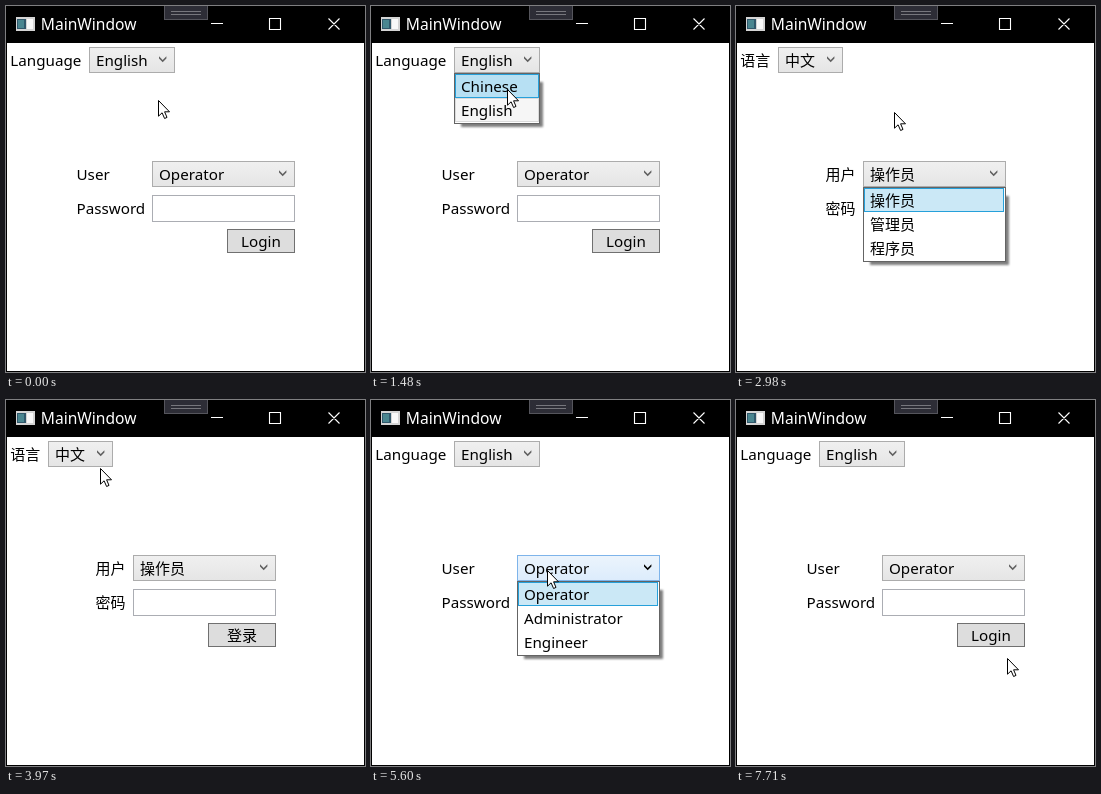
Animation of 359 by 366 pixels, one loop 7960 ms. Source, as an HTML page:

```html
<!DOCTYPE html>
<html lang="en">
<head>
<meta charset="utf-8">
<title>Login window</title>
<style>
html, body { margin: 0; width: 100%; height: 100%; overflow: hidden; background: #fff; }
svg { display: block; }
text { font: 15.2px "Noto Sans", "Noto Sans CJK SC", "Noto Sans CJK", sans-serif; white-space: pre; }
.title { font-size: 15.6px; }
.zh text { font: 15px "Noto Sans CJK SC", "Noto Sans CJK", sans-serif; }
.shadow { filter: blur(1px); opacity: .5; }
</style>
</head>
<body>
<svg width="359" height="366" viewBox="0 0 359 366">
  <defs>
    <linearGradient id="idle" x2="0" y2="1"><stop stop-color="#f0f0f0"/><stop offset="1" stop-color="#e5e5e5"/></linearGradient>
    <linearGradient id="hover" x2="0" y2="1"><stop stop-color="#ecf4fc"/><stop offset="1" stop-color="#dcecfc"/></linearGradient>
  </defs>
  <rect x=".5" y=".5" width="358" height="365" fill="#fff" stroke="#000"/>
  <rect width="359" height="37"/>
  <!-- window icon -->
  <rect x="10" y="11" width="19" height="14" fill="#d4d4d4"/>
  <rect x="11" y="13" width="9" height="10" fill="#31586b"/>
  <rect x="12" y="14" width="6" height="8" fill="#4a8690"/>
  <rect x="21" y="13" width="6" height="10" fill="#f8f8f8"/>
  <text class="title" x="34.8" y="24" fill="#fff">MainWindow</text>
  <!-- collapsed toolbar -->
  <rect x="158.5" y="-.5" width="43" height="14" fill="#2d2d36" stroke="#55555c"/>
  <path d="M165 5.5h30M165 8.5h30" stroke="#77777d"/>
  <path d="M205 17.5h12M263.5 12.5h11v11h-11zM322.5 12.5l11 11M333.5 12.5l-11 11" fill="none" stroke="#fff" stroke-width="1.1"/>
  <g id="form"></g>
  <path id="cursor" d="M.5 .5V16.2L4.1 12.8L6.6 18.5L9 17.4L6.6 11.8H11.5Z" fill="#fff" stroke="#000"/>
</svg>
<script>
const LOOP = 7960, TICK = LOOP / 64, LEAD = 19;   // the screen refreshes once per tick
const LANG = 1, USER = 2;
const PAD = 7, ROW = 24, BOX_W = 143;

const words = {
  en: { lang: 'Language', langs: ['Chinese', 'English'], user: 'User', pass: 'Password', login: 'Login',
        users: ['Operator', 'Administrator', 'Engineer'], boxX: 146, pickX: 83, pickW: 86, chosen: 1 },
  zh: { lang: '语言', langs: ['中文', '英文'], user: '用户', pass: '密码', login: '登录',
        users: ['操作员', '管理员', '程序员'], boxX: 127, pickX: 42, pickW: 65, chosen: 0 }
};

// Each click: tick, language, open list
const clicks = [
  [0, 'en', 0], [7, 'en', LANG], [13, 'zh', 0], [21, 'zh', USER], [26, 'zh', 0],
  [35, 'zh', LANG], [40, 'en', 0], [45, 'en', USER], [53, 'en', 0]
];

// Mouse key points: tick, x, y
const path = [
  [1, 152, 94], [2, 150, 91], [4, 156, 48], [7, 161, 60], [9, 146, 95], [12, 136, 83], [13, 136, 83],
  [20, 190, 164], [23, 190, 164], [24, 158, 106], [26, 125, 37], [30, 96, 75], [32, 94, 68],
  [35, 92, 58], [39, 92, 102], [40, 103, 115], [44, 176, 168], [45, 176, 170], [50, 179, 249],
  [53, 97, 111], [57, 288, 318], [59, 271, 270], [60, 271, 270], [62, 271, 258]
];

function mouse(tick) {
  const i = path.findIndex(p => p[0] > tick);
  const [t1, x1, y1] = path.at(i < 0 ? -1 : i), [t0, x0, y0] = path[Math.max(i - 1, 0)];
  const f = i < 0 ? 1 : Math.max(0, (tick - t0) / (t1 - t0 || 1));
  if (i === 0) return { x: x1, y: y1 };
  return { x: Math.round(x0 + (x1 - x0) * f), y: Math.round(y0 + (y1 - y0) * f) };
}

const rect = (x, y, w, h, fill, stroke) =>
  `<rect x="${x + .5}" y="${y + .5}" width="${w - 1}" height="${h - 1}" fill="${fill}" stroke="${stroke}"/>`;
const text = (x, y, s, anchor = 'start') => `<text x="${x}" y="${y}" text-anchor="${anchor}">${s}</text>`;
const inside = (p, x, y, w, h) => p.x >= x && p.x < x + w && p.y >= y && p.y < y + h;

function combo(p, x, y, w, label) {
  const hot = inside(p, x, y, w, 26);
  return rect(x, y, w, 26, hot ? 'url(#hover)' : 'url(#idle)', hot ? '#7eb4ea' : '#acacac') +
    text(x + PAD, y + 19, label) +
    `<path d="M${x + w - 16} ${y + 9.3}l3.7 3.7l3.7-3.7v2.3l-3.7 3.7l-3.7-3.7z" fill="${hot ? '#000' : '#606060'}"/>`;
}

function list(p, x, y, w, items, chosen) {
  const h = items.length * ROW + 3, rowW = w - 2 - w % 2;
  const top = i => y + 1 + i * ROW;
  const over = items.findIndex((_, i) => inside(p, x + 1, top(i), rowW, ROW));
  const rows = items.map((s, i) => {
    const look = i === over ? ['#b7e0f3', '#26a0da']
      : i !== chosen ? ['none', 'none']
      : over < 0 ? ['#cbe8f6', '#26a0da'] : ['#f6f6f6', '#dadada'];
    return rect(x + 1, top(i), rowW, ROW, ...look) + text(x + PAD, top(i) + 18, s);
  });
  return `<rect class="shadow" x="${x + 7}" y="${y + 9}" width="${w - 4}" height="${h - 6}"/>` +
    rect(x, y, w, h, '#fff', '#646464') + rows.join('');
}

function form(p, lang, open) {
  const k = words[lang], x = k.boxX, labelX = 216.5 - x;
  const hot = inside(p, x + 75, 223, 68, 24);
  return text(4.3, 60, k.lang) +
    combo(p, k.pickX, 41, k.pickW, k.langs[k.chosen]) +
    text(labelX, 174, k.user) +
    combo(p, x, 155, BOX_W, k.users[0]) +
    text(labelX, 208, k.pass) +
    rect(x, 189, BOX_W, 27, '#fff', '#abadb3') +
    rect(x + 75, 223, 68, 24, hot ? '#bee6fd' : '#ddd', hot ? '#3c7fb1' : '#707070') +
    text(x + 109, 241, k.login, 'middle') +
    (open === LANG ? list(p, k.pickX, 67, k.pickW, k.langs, k.chosen) : '') +
    (open === USER ? list(p, x, 181, BOX_W, k.users, 0) : '');
}

const formEl = document.getElementById('form');
const cursorEl = document.getElementById('cursor');
const start = performance.now();
let shown;

function frame() {
  const t = (performance.now() - start) % LOOP;
  const tick = Math.min(63, Math.floor((t + LEAD) / TICK));
  if (tick !== shown) {
    shown = tick;
    const p = mouse(tick);
    const [, lang, open] = clicks.findLast(c => c[0] <= tick);
    formEl.setAttribute('class', lang);
    formEl.innerHTML = form(p, lang, open);
    cursorEl.setAttribute('transform', `translate(${p.x} ${p.y})`);
  }
  requestAnimationFrame(frame);
}
frame();
</script>
</body>
</html>
```
